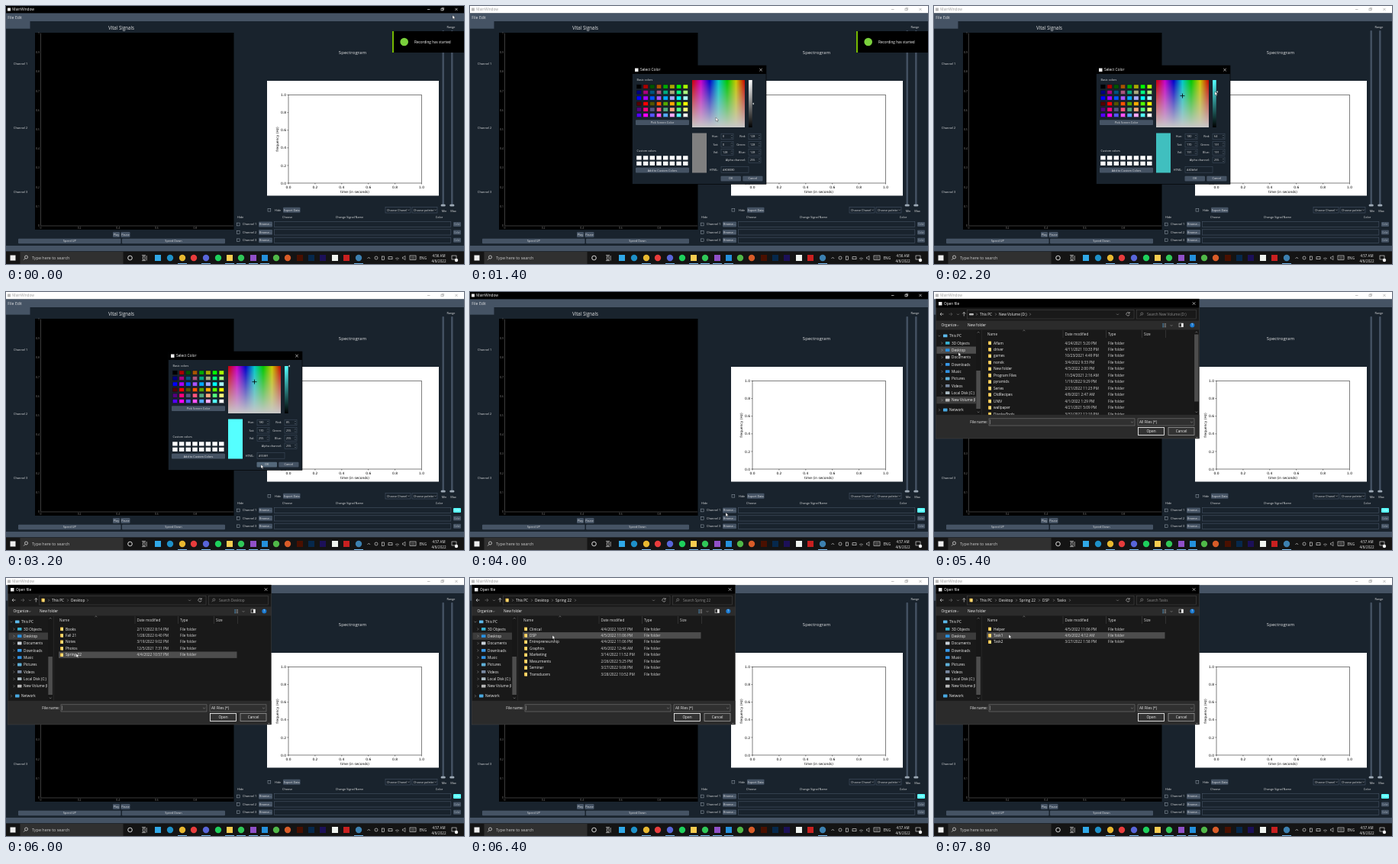
An HTML page that plays this animation: 600x338 px, repeating every 8 s.

```html
<!DOCTYPE html>
<html lang="en">
<head>
<meta charset="utf-8">
<title>Signal viewer</title>
<style>
html, body { margin: 0; width: 100%; height: 100%; overflow: hidden; background: #19232d; }
svg { display: block; width: 100vw; height: 100vh; font-family: "Open Sans", "Noto Sans", sans-serif; }
</style>
</head>
<body>
<svg id="stage" viewBox="0 0 600 338" preserveAspectRatio="none"></svg>
<script>
const STEP = 200, STEPS = 40;
const BG = '#19232d', PANEL = '#455364', INK = '#e0e1e3';
const stage = document.getElementById('stage');

const rect = (x, y, w, h, fill, extra = '') =>
  `<rect x="${x}" y="${y}" width="${w}" height="${h}" fill="${fill}" ${extra}/>`;
const frame = (x, y, w, h, stroke, fill = 'none', width = .6) =>
  rect(x, y, w, h, fill, `stroke="${stroke}" stroke-width="${width}"`);
const circle = (x, y, r, fill, extra = '') =>
  `<circle cx="${x}" cy="${y}" r="${r}" fill="${fill}" ${extra}/>`;
const path = (d, stroke, width = .6, fill = 'none') =>
  `<path d="${d}" stroke="${stroke}" stroke-width="${width}" fill="${fill}"/>`;
const text = (x, y, s, size = 3.8, fill = INK, anchor = 'start', extra = '') =>
  `<text x="${x}" y="${y}" font-size="${size}" fill="${fill}" text-anchor="${anchor}" ${extra}>${s}</text>`;
const mid = (x, y, s, size, fill, extra) => text(x, y, s, size, fill, 'middle', extra);
const end = (x, y, s, size, fill) => text(x, y, s, size, fill, 'end');
const range = (n, f) => Array.from({ length: n }, (_, i) => f(i)).join('');
const button = (x, y, w, h, label, fill = PANEL) =>
  rect(x, y, w, h, fill, 'rx="1"') + mid(x + w / 2, y + h / 2 + 1.3, label);
const chevron = (x, y, c = '#aaa') => path(`M${x - .8} ${y - 1.5}l1.5 1.5l-1.5 1.5`, c, .5);
const caret = (x, y, c = '#aaa') => path(`M${x - 1.4} ${y - .7}l1.4 1.4l1.4 -1.4`, c, .5);
const cross = (x, y, r, c) => path(`M${x - r} ${y - r}l${2 * r} ${2 * r}m0 ${-2 * r}l${-2 * r} ${2 * r}`, c, .6);

// Each entry: step at which the pointer jumps, then its tip.
const POINTER = [
  [0, 585, 12], [1, 587, 55], [2, 589, 140], [3, 590, 230], [4, 590, 284], [6, 450, 225],
  [7, 322, 146], [8, 324, 117], [9, 350, 121], [10, 368, 127], [11, 368, 112], [12, 367, 97],
  [13, 364, 125], [14, 348, 185], [15, 336, 224], [16, 334, 226], [17, 335, 245], [18, 335, 289],
  [23, 240, 225], [24, 145, 155], [25, 68, 104], [26, 35, 83], [27, 32, 79],
  [29, 62, 98], [30, 92, 99], [31, 108, 92], [32, 108, 75], [34, 101, 76], [36, 98, 74]
];
// Picked hue, saturation and value.
const COLORS = [[0, 0, 0, 128], [8, 180, 170, 128], [11, 180, 170, 191], [12, 180, 170, 255]];
// Folder listings: start step, key.
const PLACES = [[22, 'volume'], [28, 'desktop'], [31, 'spring'], [33, 'dsp'], [38, 'tasks']];
const HOVERS = [[22, -1], [30, 4], [31, 3], [32, 1], [33, -1], [34, 1], [38, 1]];
const at = (table, step) => table.filter(row => row[0] <= step).pop().slice(1);

const FOLDERS = {
  volume: { trail: ['New Volume (D:)'], rows: `Aflam|4/24/2021 5:20 PM
driver|4/11/2021 10:33 PM
games|10/23/2021 4:49 PM
norvik|3/4/2022 9:33 PM
New folder|4/3/2022 2:00 PM
Program Files|11/24/2021 2:16 AM
pyramids|1/19/2022 9:29 PM
Series|2/21/2022 11:23 PM
OldRecipes|4/8/2021 2:47 AM
UNIV|4/1/2022 1:29 PM
wallpaper|4/21/2021 5:09 PM
DisplayTools|3/31/2022 12:10 PM` },
  desktop: { trail: ['Desktop'], rows: `Books|2/11/2022 8:14 PM
Fall 21|1/28/2022 6:40 PM
Notes|3/19/2022 9:02 PM
Photos|12/5/2021 7:31 PM
Spring 22|4/4/2022 10:57 PM` },
  spring: { trail: ['Desktop', 'Spring 22'], rows: `Clinical|4/4/2022 10:57 PM
DSP|4/5/2022 11:06 PM
Entrepreneurship|4/4/2022 11:06 PM
Graphics|4/6/2022 12:46 AM
Marketing|3/14/2022 11:52 PM
Mesurments|2/26/2022 5:25 PM
Seminar|3/27/2022 9:08 PM
Transducers|3/28/2022 10:52 PM` },
  dsp: { trail: ['Desktop', 'Spring 22', 'DSP'], rows: `Lectures|4/3/2022 9:15 PM
Tasks|4/5/2022 11:06 PM` },
  tasks: { trail: ['Desktop', 'Spring 22', 'DSP', 'Tasks'], rows: `Helper|4/5/2022 11:06 PM
Task1|4/6/2022 4:12 AM
Task2|3/27/2022 1:58 PM` }
};
const CRUMB_X = { 'New Volume (D:)': 85, 'Desktop': 85, 'Spring 22': 112, 'DSP': 142, 'Tasks': 161 };

function hsv(h, s, v) {
  const channel = n => {
    const k = (n + h / 60) % 6;
    return Math.round(v - v * s / 255 * Math.max(0, Math.min(k, 4 - k, 1)));
  };
  return [channel(5), channel(3), channel(1)];
}
const rgb = c => `rgb(${c})`;

function titleBar(active) {
  const ink = active ? '#fff' : '#999';
  return rect(0, 0, 600, 9.5, active ? '#000' : '#fff') +
    rect(2, 2.5, 4, 4, active ? '#eee' : '#bbb') + text(8.3, 6.3, 'MainWindow', 4.7, ink) +
    path('M552 4.5h3.5', ink) + frame(570, 3.2, 2.7, 2.7, ink) + path('M571 3.2v-.9h2.7v2.7h-.9', ink, .5) +
    cross(590, 4.4, 1.6, ink);
}

function signalPlot() {
  const grey = '#8a8a8a';
  return mid(151, 30.7, 'Vital Signals', 6.2) + rect(38, 35, 260.5, 258, '#000') +
    path('M45.5 35.5V288H298', '#777', .5) +
    range(11, i => end(44, 289 - i * 25.2, i % 10 ? (i / 10).toFixed(1) : i / 10, 3.4, grey)) +
    range(5, i => mid(45.5 + i * 50.6, 292.2, i ? (i / 5).toFixed(1) : 0, 3.4, grey)) +
    range(3, i => text(10, 77.3 + i * 84, 'Channel ' + (i + 1), 3.9)) +
    button(140, 296, 9, 7, 'Play') + button(150.5, 296, 12, 7, 'Pause') +
    button(16, 304.8, 134.5, 6.4, 'Speed UP') + button(152, 304.8, 135, 6.4, 'Speed Down');
}

function spectrogram() {
  const font = 'font-family="DejaVu Sans, sans-serif"';
  const tick = i => (i / 5).toFixed(1);
  return mid(454, 62.5, 'Spectrogram', 6.1) + rect(342, 98, 225, 150.5, '#fff') +
    frame(370, 116.5, 174.5, 115.5, '#000', 'none', .5) +
    range(6, i => {
      const x = 370 + i * 34.9, y = 232 - i * 23.1;
      return path(`M${x} 232v1.5M370 ${y}h-1.5`, '#000', .5) +
        mid(x, 239, tick(i), 4.4, '#000', font) + text(367, y + 1.6, tick(i), 4.4, '#000', 'end', font);
    }) +
    mid(457, 244.7, 'time (in seconds)', 4.4, '#000', font) +
    mid(0, 0, 'frequency (Hz)', 4.4, '#000', font + ' transform="translate(357 174.5) rotate(-90)"');
}

function controls(firstColor) {
  const check = (x, y) => frame(x, y, 3.8, 3.8, '#9da9b5', BG, .5);
  const combo = (x, label) => frame(x, 263.5, 33, 7.5, PANEL, BG) + text(x + 2, 268.7, label, 3.75) + caret(x + 30.5, 267.3);
  const slider = x => rect(x - 1.2, 32, 2.4, 230, PANEL, 'rx="1"') + rect(x - 3, 259.8, 6, 2.6, '#9da9b5', 'rx="1.2"');
  return mid(583, 28.6, 'Range') + slider(572.7) + slider(584.3) + mid(574, 269.7, 'Min') + mid(586, 269.7, 'Max') +
    check(343, 265.3) + text(352, 268.6, 'Hide') + button(363, 263.8, 22.5, 7, 'Export Data') +
    combo(497, 'Choose Chanel') + combo(532, 'Choose palette') +
    text(303, 278.3, 'Hide') + text(362, 278.3, 'Choose') + mid(450, 278.3, 'Change Signal Name') + mid(567.5, 278.3, 'Color') +
    range(3, i => {
      const y = 286 + i * 10.4;
      const fill = i ? PANEL : firstColor;
      return check(302.3, y - 1.9) + text(310, y + 1.3, 'Channel ' + (i + 1), 3.9) +
        button(331, y - 3.4, 18, 6.8, 'Browse...') + frame(351.3, y - 3.6, 231.5, 7.2, PANEL, BG) +
        rect(586, y - 3, 10, 6, fill, 'rx="1"') + mid(591, y + 1.1, 'Color', 3.1, i || fill === PANEL ? '#aab2bc' : '#e8ffff');
    });
}

function taskbar(minute) {
  const icons = [
    [199, '#30a8e8', 1], [215, '#1e90c8'], [231, '#e8b830', 0, 1], [246, '#e83c3c'], [262, '#5865d8', 0, 1],
    [278, '#1ed05c'], [293, '#f8cc50', 1, 1], [308, '#30c858', 0, 1], [324, '#9050c8', 1, 1], [339, '#2490dc', 1, 1],
    [354, '#50b848'], [369, '#d85c28'], [385, '#4a1000', 1], [400, '#06284c', 1], [415, '#1c1058', 1],
    [431, '#f0f4f0', 1], [446, '#c82020', 1], [462, '#3c80b0', 0, 1]
  ];
  const w = '#eee';
  return rect(0, 321.5, 600, 16.5, '#141414') + rect(5.5, 326.5, 7, 7, w) + rect(18.5, 322, 135, 16, '#303030') +
    circle(26.5, 329, 2, 'none', `stroke="${w}" stroke-width=".7"`) + path('M25.1 330.6l-2 2', w, .7) +
    text(34, 331.9, 'Type here to search', 5.4, '#ccc') +
    circle(162.5, 330, 2.8, 'none', `stroke="${w}" stroke-width=".9"`) +
    frame(179.2, 328, 2.8, 4.2, w) + path('M178 326.5h5M178 333.6h5M184.2 327v6.5', w) +
    icons.map(([x, color, square, open]) =>
      (square ? rect(x - 4, 326, 8, 8, color) : circle(x, 330, 4.2, color)) +
      (open ? rect(x - 6, 337, 12, 1, '#76b9ed') : '')).join('') +
    path('M473.5 331l1.8 -1.8l1.8 1.8', w) + circle(485, 330, 2, 'none', `stroke="${w}" stroke-width=".6"`) +
    frame(492.5, 328, 3, 4.5, w) + frame(501, 328.7, 5, 3, w) +
    path('M510 331a4 4 0 0 1 5 0M511.5 332.3a2 2 0 0 1 2 0M519.5 329h1.5l2 -1.7v5.4l-2 -1.7h-1.5z', w, .5) +
    frame(529, 327, 8, 5.5, w) + path('M530.5 329h5M530.5 330.8h5', w, .4) +
    text(541.5, 331.8, 'ENG', 4.7, w) + mid(567, 328.6, `4:${minute} AM`, 4.5, w) + mid(567, 336, '4/6/2022', 4.6, w) +
    frame(584, 327, 6, 5, w) + circle(590, 333, 2.2, w);
}

const toast = () => rect(506, 33, 94, 28, '#000') + rect(506, 33, 2, 28, '#76b900') +
  circle(521.7, 47, 5.3, '#7ad03c') + text(535, 49, 'Recording has started', 4.7, '#fff');

function colorDialog(step) {
  const [h, s, v] = at(COLORS, step), color = hsv(h, s, v);
  const hueStops = range(7, i => `<stop offset="${i / 6}" stop-color="${rgb(hsv((360 - i * 60) % 360, 255, 200))}"/>`);
  const spin = (x, y, label, value) => end(x - 4, y + 1.3, label) + frame(x, y - 3.8, 16, 7.6, PANEL, BG, .5) +
    text(x + 2, y + 1.3, value) + path(`M${x + 13} ${y - .8}l1 -1l1 1m-2 2l1 1l1 -1`, '#9da9b5', .4);
  const crossX = 291 + 69 * (360 - h) / 360, crossY = 159 - 62 * s / 255;
  const markY = 159 - 62 * v / 255;
  const hex = '#' + color.map(c => c.toString(16).padStart(2, '0')).join('');
  return `<defs><linearGradient id="hue">${hueStops}</linearGradient>
    <linearGradient id="fade" x2="0" y2="1"><stop stop-color="#c8c8c8" stop-opacity="0"/><stop offset="1" stop-color="#c8c8c8"/></linearGradient>
    <linearGradient id="value" x2="0" y2="1"><stop stop-color="${rgb(hsv(h, s, 255))}"/><stop offset="1"/></linearGradient></defs>` +
    frame(212.5, 78, 175.5, 155.3, '#000', BG) + rect(212.5, 78, 175.5, 11, '#000') +
    rect(216, 81.5, 4.5, 4.5, '#eee') + text(223, 85.3, 'Select Color', 4.8, '#fff') + cross(381, 83.6, 1.8, '#fff') +
    text(218.5, 98.3, 'Basic colors') +
    range(48, i => {
      const c = [(i / 3 | 0) % 4 * 85, (i / 12 | 0) * 85, i % 3 * 127.5 | 0];
      return frame(218.2 + (i / 6 | 0) * 8.7, 103 + i % 6 * 7.5, 6.4, 5.2, '#0c1218', rgb(c), .5);
    }) +
    button(217, 149.3, 70, 6.8, 'Pick Screen Color') + text(218.5, 190.8, 'Custom colors') +
    range(16, i => rect(218.2 + i % 8 * 8.7, 196.3 + (i / 8 | 0) * 7.4, 6.4, 5.2, '#fff')) +
    button(217, 211.8, 70, 6.8, 'Add to Custom Colors') +
    rect(291, 97, 69, 62, 'url(#hue)') + rect(291, 97, 69, 62, 'url(#fade)') +
    (s ? path(`M${crossX - 3} ${crossY}h6m-3 -3v6`, '#000', .8) : '') +
    rect(365, 97, 4.7, 62, 'url(#value)') + path(`M370 ${markY}l1.8 -1.5v3z`, 'none', 0, '#dfe1e2') +
    rect(291, 166.5, 19, 52, rgb(color)) +
    spin(329, 171, 'Hue:', h) + spin(329, 181.2, 'Sat:', s) + spin(329, 191.4, 'Val:', v) +
    ['Red:', 'Green:', 'Blue:'].map((name, i) => spin(365, 171 + i * 10.2, name, color[i])).join('') +
    spin(365, 201.7, 'Alpha channel:', 255) +
    end(325, 215.8, 'HTML:') + frame(329, 210.6, 36, 7.6, PANEL, BG, .5) + text(331, 215.8, hex) +
    button(328.5, 222.7, 26.5, 6.8, 'OK', step > 14 ? '#54687a' : PANEL) + button(357.3, 222.7, 26.2, 6.8, 'Cancel');
}

function sidebar(step) {
  const items = [
    ['This PC', 57.5, '#5cb8e8'], ['3D Objects', 67, '#38b0d0'], ['Desktop', 76.2, '#2890e0'], ['Documents', 85.6, '#c8d0d8'],
    ['Downloads', 95, '#3898e8'], ['Music', 104.2, '#3090e0'], ['Pictures', 113.6, '#60b0d8'], ['Videos', 123, '#7888a0'],
    ['Local Disk (C:)', 132.3, '#a8b8c0'], ['New Volume (I', 141.7, '#b8b8b8'], ['Network', 154.6, '#48a8e0']
  ];
  const atVolume = step < 28;
  return items.map(([name, y, color], i) => {
    const lit = i === 2 ? step >= 26 : i === 9 && atVolume;
    const x = i % 10 ? 23 : 20;
    return (lit ? rect(3.5, y - 4.7, 51.5, 9.3, i === 2 && atVolume ? '#4d4d4d' : '#3c3c3c') : '') +
      (step < 38 ? (i ? chevron(i === 10 ? 7 : 10.5, y) : caret(7, y)) : '') +
      rect(x - 8, y - 2, 5.5, 3.8, color, 'rx=".6"') + text(x, y + 1.6, name, 4.7, '#f0f0f0');
  }).join('') +
    rect(55, 50, 6.3, 110.5, '#171717') + rect(55.3, 103, 5.6, 50, '#4d4d4d') +
    path('M56.8 53.5l1.4 -1.4l1.4 1.4', '#aaa', .5) + caret(58.2, 157.3);
}

function fileDialog(step) {
  const [key] = at(PLACES, step), [hover] = at(HOVERS, step);
  const { trail, rows } = FOLDERS[key];
  const w = '#f0f0f0', dark = '#191919', panel = '#2b2b2b', line = '#4a4a4a';
  const folder = (x, y) => rect(x, y - 2.3, 4, 4.6, '#e8b840', 'rx=".5"') + rect(x + 1.3, y - 1.7, 2.7, 4, '#ffdc78');
  const list = rows.split('\n').map((row, i) => {
    const [name, date] = row.split('|'), y = 66.8 + i * 8.47;
    return (i === hover ? rect(69, y - 4.2, 233.5, 8.4, '#4d4d4d') : '') + folder(71, y) +
      text(78, y + 1.7, name, 4.75, w) + text(171.5, y + 1.7, date, 4.75, '#d8d8d8') + text(228, y + 1.7, 'File folder', 4.65, '#d8d8d8');
  }).join('');
  const crumbs = ['This PC', ...trail].map(name => {
    const x = CRUMB_X[name] || 60;
    return chevron(x - 4, 29.2) + text(x, 30.8, name, 4.75, w);
  }).join('');
  const volume = key === 'volume';
  return rect(2.5, 9, 345, 183, dark) + rect(2.5, 9, 345, 11.5, '#000') +
    rect(6, 13, 4.5, 4.5, '#eee') + text(13, 17, 'Open file', 4.75, '#fff') + cross(340.5, 15, 1.8, '#fff') +
    path('M12.5 29h-4.5m2 -2l-2 2l2 2', w) + path('M19.5 29h4.5m-2 -2l2 2l-2 2', step > 27 ? '#777' : '#666') + caret(31.5, 29.3) +
    path('M39.3 31.5v-5m-2 2l2 -2l2 2', w) + frame(43.5, 23.5, 218.5, 11.5, line, dark, .5) +
    (volume ? rect(46, 28, 6, 2.6, '#b8b8b8', 'rx="1"') : folder(46.5, 29)) + crumbs +
    (volume ? chevron(126, 29.2) : chevron({ desktop: 107, spring: 138, dsp: 157, tasks: 178 }[key], 29.2)) +
    caret(240.5, 29.3) + path('M255.8 27.5a2.2 2.2 0 1 0 .4 2M256.2 26v2h-2', w, .5) +
    frame(265.5, 23.5, 78, 11.5, line, dark, .5) + circle(272.3, 28.5, 1.5, 'none', 'stroke="#aaa" stroke-width=".5"') +
    path('M271.2 29.7l-1.6 1.6', '#aaa', .5) + text(279, 30.8, 'Search ' + trail[trail.length - 1], 4.65, '#8c8c8c') +
    rect(2.5, 37.5, 345, 12, panel) + text(9.5, 45.2, 'Organize', 4.75, w) + caret(31, 43.8) + text(44, 45.2, 'New folder', 4.75, w) +
    range(3, i => rect(299.5, 41.2 + i * 1.9, 1.2, 1.2, '#58a8e0') + path(`M301.6 ${41.8 + i * 1.9}h2.5`, w, .5)) + caret(311, 43.8) +
    frame(321, 41, 5.5, 4.8, w, 'none', .5) + rect(324, 41, 2.5, 4.8, w) +
    circle(338.3, 43.5, 3, '#1878d0') + mid(338.3, 45.2, '?', 4.6, '#fff') +
    sidebar(step) + path('M62.3 50V160.5', '#333', .5) +
    path('M116.5 51l1.4 -1.2l1.4 1.2', '#aaa', .5) +
    [['Name', 70], ['Date modified', 171.5], ['Type', 228], ['Size', 275]].map(([s, x]) => text(x, 56.8, s, 4.65, '#ddd')).join('') +
    path('M169 50v10M225.5 50v10M272.5 50v10M303.5 50v10', line, .5) + list +
    (volume ? rect(340.8, 50, 6, 110.5, '#171717') + rect(341.1, 55.5, 5.4, 88, '#4d4d4d') +
      path('M342.4 53.3l1.4 -1.4l1.4 1.4', '#aaa', .5) + caret(343.8, 157.3) : '') +
    rect(2.5, 160.8, 345, 31.2, panel) + end(70, 171.8, 'File name:', 4.75, w) +
    frame(72, 165.8, 191, 9.2, '#777', '#303030') + caret(259.5, 170.5) + path('M73.6 167.3v6', '#ddd', .4) +
    frame(267, 165.8, 74, 9.2, '#777', '#303030') + text(269, 171.9, 'All Files (*)', 4.75, w) + caret(337.5, 170.5) +
    frame(267.5, 177.5, 34, 10, '#fff', '#333', .8) + mid(284.5, 184.1, 'Open', 4.75, w) +
    frame(307, 177.5, 34, 10, '#999', '#333', .8) + mid(324, 184.1, 'Cancel', 4.75, w) +
    range(3, i => rect(345.5 - i * 1.2, 190, .7, .7, '#aaa')) + frame(2.5, 9, 345, 183, line, 'none', .4);
}

function scene(step) {
  const picking = step >= 5 && step < 17, browsing = step >= 22;
  const [x, y] = at(POINTER, step);
  return rect(0, 0, 600, 338, BG) + titleBar(!picking && !browsing) + rect(0, 9.5, 600, 10.5, PANEL) +
    text(2.3, 16.6, 'File', 5) + text(12, 16.6, 'Edit', 5) + rect(0, 20, 31.5, 9.7, PANEL) +
    signalPlot() + spectrogram() + controls(step < 16 ? PANEL : '#55ffff') + rect(0, 314, 600, 7.5, PANEL) +
    taskbar(step < 11 ? 56 : 57) +
    (step < 11 ? toast() : '') + (picking ? colorDialog(step) : '') + (browsing ? fileDialog(step) : '') +
    path(`M${x} ${y}v5l1.2 -1.1l.8 1.9l.9 -.4l-.8 -1.8h1.6z`, '#000', .3, '#fff');
}

let shown = -1;
function tick() {
  const step = Math.floor(performance.now() / STEP) % STEPS;
  if (step !== shown) stage.innerHTML = scene(shown = step);
  requestAnimationFrame(tick);
}
tick();
</script>
</body>
</html>
```
